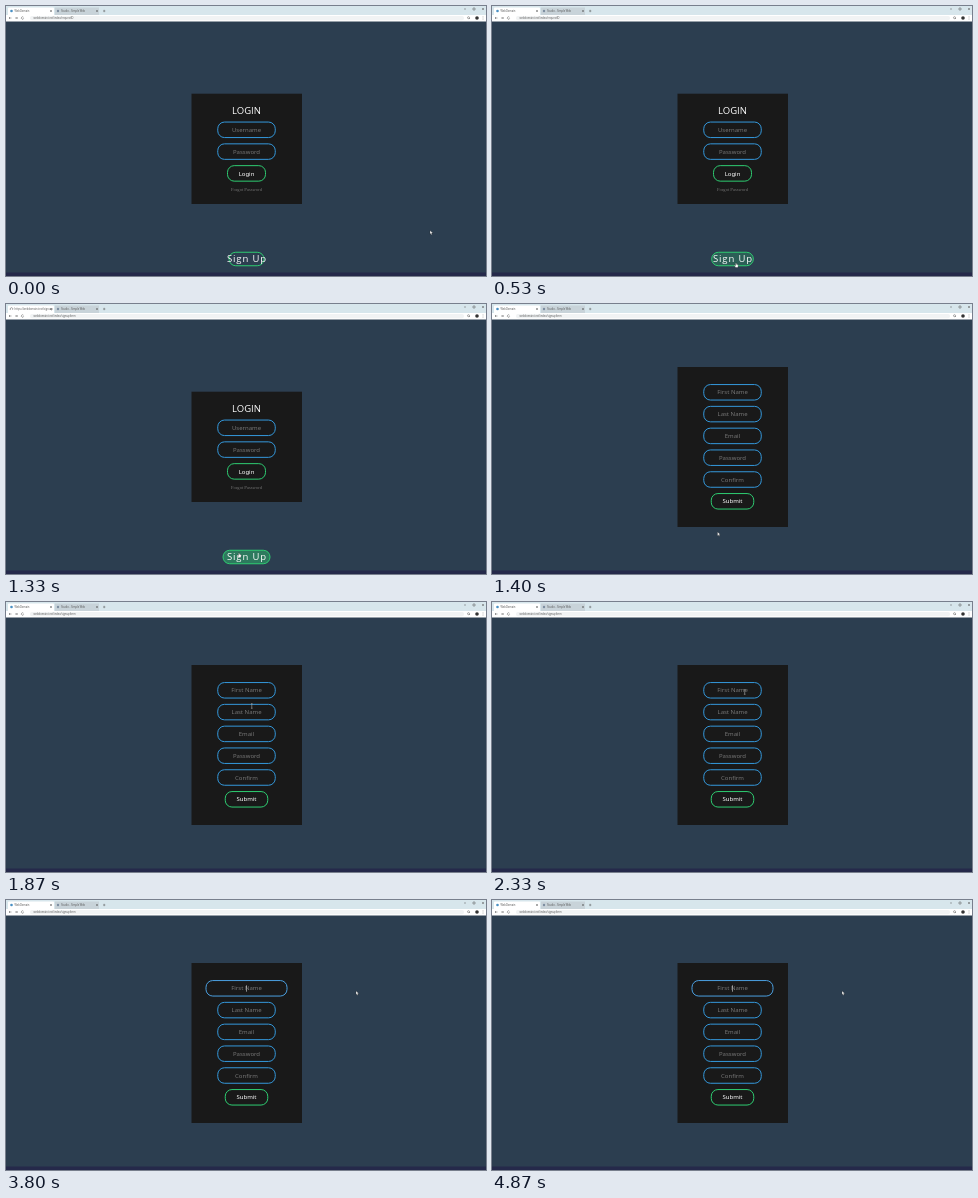
An HTML page for the animation above (4.99 s loop, 480 by 270 pixels).

```html
<!DOCTYPE html>
<html lang="en">
<head>
<meta charset="utf-8">
<title>Login and sign up</title>
<style>
html, body { margin: 0; width: 100%; height: 100%; overflow: hidden; background: #2c3e50; }
svg { display: block; width: 100vw; height: 100vh; }
text { font: 6px "Noto Sans", "Open Sans", sans-serif; fill: #777; text-anchor: middle; }
.head { font: 9.5px "Open Sans", sans-serif; font-stretch: 75%; fill: #fff; }
.label { font-weight: 500; fill: #fff; }
.link { font: 4.6px "Liberation Serif", serif; fill: #747474; }
.tiny { font: 2.6px "Open Sans", sans-serif; fill: #555; text-anchor: start; }
.pill { fill: none; stroke: #3498db; }
.go { stroke: #2ecc71; }
.icon { fill: none; stroke: #555; stroke-width: .5; }
</style>
</head>
<body>
<svg viewBox="0 0 480 270">
  <rect width="480" height="270" fill="#2c3e50"/>
  <rect y="266.5" width="480" height="4" fill="#25294a"/>

  <rect width="480" height="9" fill="#d7e6ec"/>
  <rect x="49" y="1.5" width="44" height="7.5" fill="#c8d3d9"/>
  <path d="M2 9V2.500q0-1 1-1h44q1 0 1 1V9h432v6.500H0V9z" fill="#fff"/>
  <rect x="24" y="10" width="434" height="4.200" rx="2" fill="#f1f3f4"/>
  <circle id="favicon" cx="5.500" cy="5" r="1.300" fill="#4a90c4"/>
  <path id="spinner" d="M4.200 5a1.300 1.300 0 1 1 1.300 1.300" class="icon"/>
  <circle cx="52" cy="5" r="1.200" fill="#7c8ea0"/>
  <text id="tab" class="tiny" x="8.500" y="6"></text>
  <text class="tiny" x="55" y="6">Studio - Simple Web</text>
  <text id="url" class="tiny" x="27.500" y="13"></text>
  <path class="icon" d="M44 4l2 2m0-2l-2 2M90 4l2 2m0-2l-2 2M97 5h2.400m-1.200-1.200v2.400M458 3h2M467 2h2v2h-2zM476 2l2 2m0-2l-2 2M5.500 12h-2.500l1-1m-1 1l1 1M9 12h2.500l-1-1m1 1l-1 1M17.500 11.300a1.200 1.200 0 1 0 .2 1M464 13l-1-1"/>
  <circle class="icon" cx="462.500" cy="11.700" r="1"/>
  <circle cx="471" cy="12" r="1.800" fill="#333"/>
  <path class="icon" stroke-dasharray=".6 .6" d="M477 10.500v3"/>

  <g id="login"></g>
  <g id="signup"></g>
  <g id="pointer" stroke="#222" stroke-width=".3" fill="#fff">
    <path id="arrow" d="M0 0v3.700l.9-.8.6 1.300.7-.3-.6-1.300h1.200z"/>
    <path id="hand" d="M-.4 0h.9v1.300l1.700.5v1.500l-.5 1.200h-2l-1.400-2 .5-.4.800.600z"/>
    <path id="beam" d="M-.8-2.300h1.600M0-2.300v4.600M-.8 2.300h1.600" stroke="#aaa" stroke-width=".6"/>
  </g>
</svg>
<script>
const LOOP = 4990, STEP = 1000 / 15;
const HOVER = 400, CLICK = 795, LOADED = 1395, FOCUS = 2660, BLINK = 1600 / 3;
const $ = id => document.getElementById(id);
const clamp = v => Math.max(0, Math.min(1, v));
const ease = v => { v = clamp(v); return v * v * (3 - 2 * v); };
const show = (id, on) => $(id).style.display = on ? "" : "none";

const text = (s, y, cls = "") => `<text class="${cls}" x="240.500" y="${y}">${s}</text>`;
const pill = (y, w, cls = "", h = 15.5, id = "") =>
  `<rect id="${id}" class="pill ${cls}" x="${240.5 - w / 2}" y="${y - h / 2}" width="${w}" height="${h}" rx="6.700"/>`;
const field = (s, y, id) => pill(y, 57.5, "", 15.5, id) + text(s, y + 2.1);
const button = (s, y, w) => pill(y, w, "go") + text(s, y + 2.1, "label");
const panel = (y, h) => `<rect x="185.500" y="${y}" width="110.500" height="${h}" fill="#191919"/>`;

$("login").innerHTML = panel(87.7, 110.3) + text("LOGIN", 108.4, "head") +
  field("Username", 123.8) + field("Password", 145.6) + button("Login", 167.4, 38) +
  text("Forgot Password", 185.3, "link") +
  pill(253, 35, "go", 13.5, "join") +
  `<text class="head" x="241" y="256.400" letter-spacing=".9">Sign Up</text>`;
$("signup").innerHTML = panel(63, 160) +
  ["First Name", "Last Name", "Email", "Password", "Confirm"]
    .map((s, i) => field(s, 88.3 + i * 21.8, "field" + i)).join("") +
  button("Submit", 197.3, 42.5) +
  `<path id="caret" d="M240.500 85.300v6.400" stroke="#ddd" stroke-width=".6"/>`;

// time, x, y
const path = [
  [0, 424, 224.500], [200, 370, 233], [333, 288, 248], [400, 257, 255], [533, 244, 257],
  [1067, 244, 257], [1267, 241, 255], [1333, 233, 249], [1400, 225.500, 228], [1467, 221, 165],
  [1533, 219, 119], [1667, 224, 113], [1933, 253, 101], [2067, 253, 99.500], [2333, 252.700, 90],
  [2733, 252.700, 90], [2867, 281, 96], [3000, 318, 99], [3200, 350, 91]
];
function pointerAt(t) {
  const i = path.findIndex(p => p[0] > t);
  if (i < 0) return path[path.length - 1].slice(1);
  const [a, b] = [path[i - 1], path[i]], k = (t - a[0]) / (b[0] - a[0]);
  return [1, 2].map(n => a[n] + (b[n] - a[n]) * k);
}

function widen(id, w) {
  $(id).setAttribute("x", 240.5 - w / 2);
  $(id).setAttribute("width", w);
}

function draw(now) {
  const t = Math.floor((now % LOOP + 4) / STEP) * STEP + 1;
  const loaded = t >= LOADED, loading = t >= CLICK && !loaded;
  show("login", !loaded);
  show("signup", loaded);
  show("favicon", !loading);
  show("spinner", loading);
  $("spinner").setAttribute("transform", `rotate(${t * .5} 5.5 5)`);
  $("tab").textContent = loading ? "https://webdomain.test/sign-up" : "WebDomain";
  $("url").textContent = "webdomain.test/index/" + (t >= CLICK ? "signupform" : "requestID");

  const hover = ease((t - HOVER) / 250);
  widen("join", 35 + 12 * hover);
  $("join").style.fill = `rgba(46, 204, 113, ${.42 * hover})`;

  widen("field0", 57.5 + 23.5 * ease((t - FOCUS) / 270));
  $("field0").style.stroke = t >= FOCUS + STEP ? "#4b9fe0" : "";
  const since = t - FOCUS - STEP;
  show("caret", since >= 0 && Math.floor(since / BLINK) % 2 === 0);

  const [x, y] = pointerAt(t - 1);
  const onJoin = !loaded && Math.abs(x - 240.5) < 24 && Math.abs(y - 253) < 7;
  const half = t >= FOCUS ? 40 : 29;
  const onField = loaded && Math.abs(x - 240.5) < half &&
    [0, 1, 2, 3, 4].some(i => Math.abs(y - 88.3 - i * 21.8) < 8);
  $("pointer").setAttribute("transform", `translate(${x} ${y})`);
  show("hand", onJoin);
  show("beam", onField);
  show("arrow", !onJoin && !onField);
}

const start = performance.now();
function tick() {
  draw(performance.now() - start);
  requestAnimationFrame(tick);
}
tick();
</script>
</body>
</html>
```
